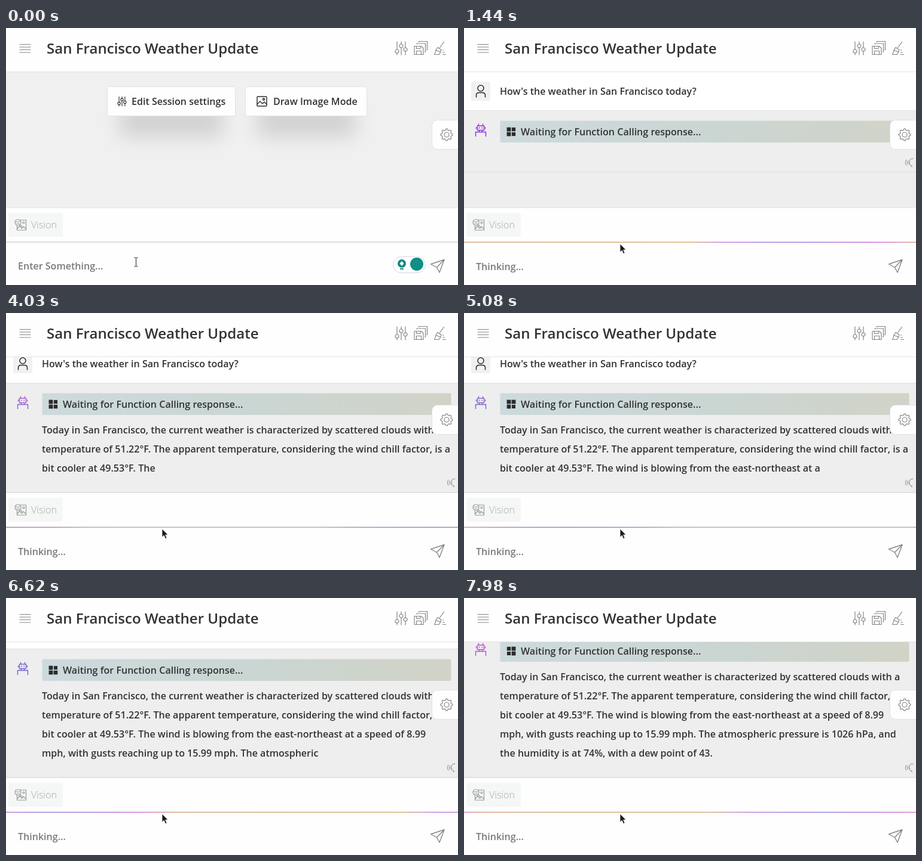
Animation of 756 by 431 pixels, one loop 8 s. Source, as an HTML page:

```html
<!DOCTYPE html>
<html lang="en">
<head>
<meta charset="utf-8">
<title>Weather chat</title>
<style>
  html, body { margin: 0; width: 756px; height: 431px; overflow: hidden; background: #fff; }
  svg { display: block; }
  text { font: 600 16.06px "Open Sans", "Noto Sans", sans-serif; fill: #323232; }
  .title { font-size: 24.09px; }
  .light { font-weight: 300; fill: #a6aaa7; }
  .hint { fill: #757a78; }
  .icon { fill: none; stroke: #858585; stroke-width: 1.2; stroke-linecap: round; stroke-linejoin: round; }
  .dark { stroke: #2b2b2b; }
</style>
</head>
<body>
<svg width="756" height="431" viewBox="0 0 756 431">
  <defs>
    <clipPath id="chatClip"><rect y="74" width="756" height="227"/></clipPath>
    <linearGradient id="barFill">
      <stop offset="0" stop-color="#cddadd"/><stop offset=".5" stop-color="#cad6d3"/><stop offset="1" stop-color="#d1d3c7"/>
    </linearGradient>
    <linearGradient id="lineFill" gradientUnits="userSpaceOnUse" x1="0" x2="756" spreadMethod="repeat">
      <stop offset="0" stop-color="#8a6ee0"/><stop offset=".06" stop-color="#a868e0"/><stop offset=".17" stop-color="#cf62dc"/>
      <stop offset=".25" stop-color="#dca070"/><stop offset=".75" stop-color="#dca870"/>
      <stop offset=".83" stop-color="#c070dc"/><stop offset="1" stop-color="#8a6ee0"/>
    </linearGradient>
    <linearGradient id="botFill" gradientUnits="userSpaceOnUse" x1="0" y1="160" x2="0" y2="182">
      <stop id="botTop" offset=".3"/><stop id="botBase" offset="1"/>
    </linearGradient>
    <filter id="soft" x="-40%" y="-120%" width="180%" height="340%"><feGaussianBlur stdDeviation="16"/></filter>
    <g id="sliders">
      <path d="M-7-11V2M-7 8V11M0-11V-7M0-1V11M7-11V-1M7 5V11"/>
      <circle cx="-7" cy="5" r="3"/><circle cy="-4" r="3"/><circle cx="7" cy="2" r="3"/>
    </g>
  </defs>

  <rect width="756" height="431" fill="#fff"/>
  <rect y="74" width="756" height="227" fill="#f0f0f0"/>

  <g id="start">
    <g filter="url(#soft)" fill="#000" opacity=".12">
      <rect x="190" y="127" width="173" height="56"/><rect x="421" y="127" width="163" height="56"/>
    </g>
    <g fill="#fefefe" stroke="#e2e2e2">
      <rect x="169.500" y="98.500" width="214" height="49" rx="2"/><rect x="400.500" y="98.500" width="203" height="49" rx="2"/>
    </g>
    <use href="#sliders" class="icon dark" transform="translate(194 123) scale(.7)" style="stroke-width:1.6"/>
    <text x="210" y="129">Edit Session settings</text>
    <g class="icon dark" style="stroke-width:1.4">
      <rect x="420" y="115" width="16" height="16" rx="1"/>
      <path d="M420 128l5-5 4 4 3-3 4 4"/><circle cx="431" cy="119.500" r="1.500"/>
    </g>
    <text x="447" y="129">Draw Image Mode</text>
  </g>

  <g id="chat" clip-path="url(#chatClip)">
    <g id="scroll">
      <rect y="74" width="756" height="64" fill="#fff"/>
      <rect x="12" y="90" width="32" height="32" rx="2" fill="#f1f1f1"/>
      <g class="icon dark" style="stroke-width:1.5">
        <circle cx="28" cy="101" r="5"/><path d="M20.500 116V113Q20.500 108.500 25 108.500H31Q35.500 108.500 35.500 113V116"/>
      </g>
      <text x="60" y="112">How's the weather in San Francisco today?</text>
      <path d="M0 138.500H756" stroke="#e0e0e0"/>
      <g id="reply">
        <rect y="139" width="756" height="330" fill="#eee"/>
        <g fill="none" stroke="url(#botFill)" stroke-width="1.400">
          <path d="M22.500 164H33.500V171.500H22.500ZM24.500 164V160.500M31.500 164V160.500M20.500 166V169.500M35.500 166V169.500M25.500 171.500V174.500M30.500 171.500V174.500M19.500 182V174.500H36.500V182"/>
          <path d="M25 167.500H26.500M29.500 167.500H31" stroke-width="2"/>
        </g>
        <rect x="60.500" y="155.500" width="684" height="36.500" rx="2" fill="url(#barFill)"/>
        <g id="blocks" fill="#2b2b2b"></g>
        <text x="95" y="180">Waiting for Function Calling response...</text>
        <g id="lines"></g>
        <g id="footer">
          <path d="M0 .5H756" stroke="#e1e1e1"/>
          <path class="icon" style="stroke-width:1" d="M740-20Q736.500-15.500 740-11M742.500-18.500Q740-15.500 742.500-12.500M751-22Q745-22 745.500-18L743.500-15H745.500V-11.500Q746-10 749-10.500V-8"/>
        </g>
      </g>
    </g>
  </g>

  <g id="header">
    <rect width="756" height="73" fill="#fefefe"/>
    <path d="M0 73.500H756" stroke="#e3e3e3"/>
    <path class="icon" d="M23 27.500H41M23 32H41M23 36.500H41M23 41H41"/>
    <text class="title" x="68" y="43">San Francisco Weather Update</text>
    <g class="icon">
      <use href="#sliders" transform="translate(661 34)"/>
      <path d="M683 30.500H694.500L698 34V44.500H683ZM686.500 30.500V34.500H693V30.500M687 27V26H701.500V40H700.500M690.500 23.500V22.500H704.500V36.500H703.500"/>
      <rect x="686.500" y="38.500" width="8" height="6"/>
      <path d="M732.500 23.500L725.500 33M722 32.500L728 36.500Q727 41.500 724 44.500H716.500Q718.500 41.500 719 37ZM719.500 37.500L727 40.500M730.500 37H732M730.500 41H733.500M730.500 44.500H735.500"/>
    </g>
  </g>

  <rect x="712.500" y="154.500" width="60" height="49" rx="9" fill="#fefefe" stroke="#e2e2e2"/>
  <g class="icon"><path id="gear"/><circle cx="737" cy="179" r="4"/></g>

  <rect y="301" width="756" height="130" fill="#fefefe"/>
  <path d="M0 301.500H756" stroke="#e4e4e4"/>
  <rect x="4" y="310" width="91" height="40" rx="3" fill="#f5f6f6"/>
  <g class="icon" style="stroke:#949b97">
    <path d="M24 322H33.500V339H18.500V332M18.500 337L23 332L26.500 336L29 333L33.500 337"/>
    <circle cx="20" cy="326" r="5"/><path d="M17 325H23M18 328H22M24 330L27 333"/><circle cx="29.500" cy="326.500" r="1.500"/>
  </g>
  <text class="light" x="42" y="336">Vision</text>

  <rect y="358" width="756" height="2" fill="#dedede"/>
  <rect id="progress" y="359" width="756" height="1" fill="url(#lineFill)"/>
  <text id="hint" class="hint" x="20"></text>
  <g id="helper">
    <rect x="647.500" y="383.500" width="54" height="27" rx="13.500" fill="#fff" stroke="#d5d8e5"/>
    <circle cx="662" cy="395" r="7" fill="#0f8a82"/><path d="M659 403H665V405H659Z" fill="#0f8a82"/>
    <path d="M662 391L665.500 395L662 399L658.500 395Z" fill="#fff"/>
    <circle cx="687" cy="396" r="11" fill="#0f8f86"/>
  </g>
  <path class="icon" style="stroke-width:1.4" d="M710.500 396L733 388.500L725 410L720.500 401.500ZM720.500 401.500L733 388.500"/>

  <path id="beam" fill="none" stroke="#222" d="M-3-7.500H-1L0-6.500L1-7.500H3M0-6.500V6.500M-3 7.500H-1L0 6.500L1 7.500H3"/>
  <path id="arrow" d="M0 0V14L3.200 11L5.500 16.500L8 15.400L5.700 10H10Z" fill="#1c1c1c" stroke="#fff" stroke-width=".8"/>
</svg>

<script>
const LOOP = 8000, SENT = 350, WAITING = 490;
const $ = id => document.getElementById(id);
const show = (id, on) => $(id).setAttribute('display', on ? 'inline' : 'none');
const move = (id, x, y) => $(id).setAttribute('transform', `translate(${x} ${y})`);
const clamp = v => Math.min(1, Math.max(0, v));

function add(parent, tag, attrs) {
  const node = document.createElementNS('http://www.w3.org/2000/svg', tag);
  for (const key in attrs) node.setAttribute(key, attrs[key]);
  return $(parent).appendChild(node);
}

const lines = [
  'Today in San Francisco, the current weather is characterized by scattered clouds with a ',
  'temperature of 51.22°F. The apparent temperature, considering the wind chill factor, is a ',
  'bit cooler at 49.53°F. The wind is blowing from the east-northeast at a speed of 8.99 ',
  'mph, with gusts reaching up to 15.99 mph. The atmospheric pressure is 1026 hPa, and ',
  'the humidity is at 74%, with a dew point of 43.'
];
const reply = lines.join('');
const tokenEnds = [...reply.matchAll(/ ?[A-Za-z]+| ?\d{1,3}|[^\w]/g)].map(m => m.index + m[0].length);

// Streaming pace: the moment each phrase has been completed.
const pace = [
  [1860, ''], [2560, 'clouds with a'], [2910, '51.22'], [3540, 'factor, is a'],
  [4030, '49.53°F. The'], [5300, '8.99'], [5780, 'reaching up'],
  [7150, 'hPa, and'], [7360, 'humidity is'], [7900, '43.']
].map(([time, phrase]) => [time, reply.indexOf(phrase) + phrase.length]);

const scrolls = [[3670, 21], [5400, 53], [7430, 85]];
const botTints = [
  [0, '#9a30e0', '#6f35e4'], [2000, '#8a35e0', '#5a3ee4'], [2800, '#a045dc', '#5050e0'],
  [3700, '#b05cd0', '#6668d8'], [4700, '#9060cc', '#6668d0'], [5500, '#7468c8', '#6a66c8'],
  [7000, '#9a5cc8', '#5f62d0'], [7600, '#c44fd6', '#a850dc']
];
const latest = (list, t) => list.filter(item => item[0] <= t).pop();

function charsAt(t) {
  const i = pace.findIndex(([time]) => time > t);
  if (i === 0) return 0;
  if (i < 0) return reply.length;
  const [t0, c0] = pace[i - 1], [t1, c1] = pace[i];
  const count = c0 + (c1 - c0) * (t - t0) / (t1 - t0) + 0.01;
  return tokenEnds.filter(end => end <= count).pop() || 0;
}

const lineNodes = lines.map((_, i) => add('lines', 'text', { x: 60, y: 223 + 32 * i }));
const blocks = [[75, 170], [83, 170], [83, 178], [75, 178]].map(([x, y]) => ({ x, y, node: add('blocks', 'rect', {}) }));

const gearPoints = Array.from({ length: 32 }, (_, i) => {
  const r = i % 4 < 2 ? 10 : 7.8, a = (i - 0.5) * Math.PI / 16;
  return `${(737 + r * Math.cos(a)).toFixed(2)} ${(179 + r * Math.sin(a)).toFixed(2)}`;
});
$('gear').setAttribute('d', `M${gearPoints.join('L')}Z`);

function drawReply(t) {
  const shown = charsAt(t);
  let start = 0, rows = 0;
  lines.forEach((line, i) => {
    const part = line.slice(0, Math.max(0, shown - start)).trimEnd();
    if (part) rows = i + 1;
    lineNodes[i].textContent = part;
    start += line.length;
  });
  move('footer', 0, rows ? 225 + 32 * rows : 241);
  const scrolled = latest(scrolls, t);
  move('scroll', 0, scrolled ? -scrolled[1] : 0);

  const [, top, base] = latest(botTints, t);
  $('botTop').setAttribute('stop-color', top);
  $('botBase').setAttribute('stop-color', base);

  blocks.forEach(({ x, y, node }, i) => {
    const size = 6.8 - 0.8 * Math.max(0, Math.sin(t / 140 - i * Math.PI / 2));
    node.setAttribute('x', x - size / 2);
    node.setAttribute('y', y - size / 2);
    node.setAttribute('width', size);
    node.setAttribute('height', size);
  });
}

// The rainbow line glides right and repeats once per stage width.
function drawProgress(t) {
  const shift = (0.93 * (t - 4030) - 48) % 756;
  $('lineFill').setAttribute('gradientTransform', `translate(${shift} 0)`);
}

function drawPointer(t) {
  const k = clamp((t - 70) / 490);
  const x = 217 + 44 * k, y = 392 - 30 * k;
  show('beam', k < 0.6);
  show('arrow', k >= 0.6);
  move('beam', x + 0.5, y + 0.5);
  move('arrow', x, y);
}

function draw(t) {
  const sent = t >= SENT;
  show('start', !sent);
  show('helper', !sent);
  show('chat', sent);
  show('progress', sent);
  show('reply', t >= WAITING);
  $('hint').textContent = sent ? 'Thinking...' : 'Enter Something...';
  $('hint').setAttribute('y', sent ? 406 : 405);
  drawReply(t);
  drawProgress(t);
  drawPointer(t);
}

const began = performance.now();
function tick() {
  draw((performance.now() - began) % LOOP);
  requestAnimationFrame(tick);
}
tick();
</script>
</body>
</html>
```
